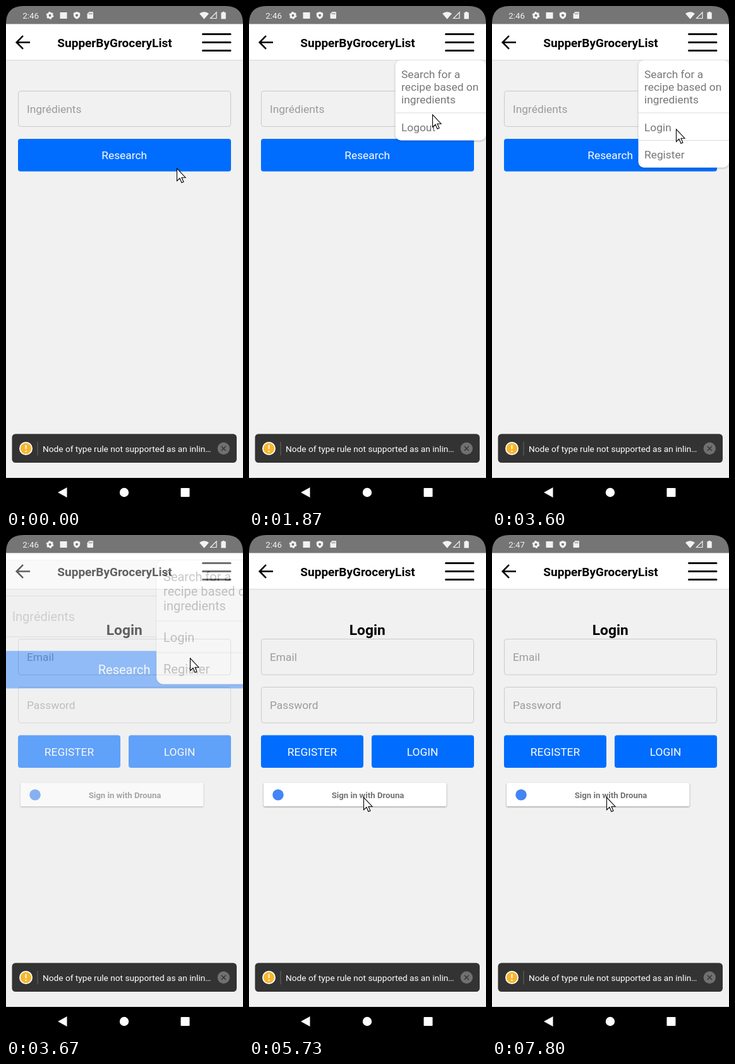
An HTML page that plays this animation: 375x792 px, repeating every 8 s.

```html
<!DOCTYPE html>
<html lang="en">
<head>
<meta charset="utf-8">
<title>Recipe search and login</title>
<style>
  html, body { margin: 0; width: 100%; height: 100%; overflow: hidden; background: #000; }
  svg { display: block; width: 100%; height: 100%; }
  text { font: 17.35px Roboto, sans-serif; }
  .title { font-size: 19px; font-weight: 700; text-anchor: middle; }
  .heading { font-size: 22.8px; font-weight: 700; text-anchor: middle; }
  .hint { fill: #9b9b9b; }
  .label { fill: #fff; text-anchor: middle; }
  .item { fill: #777; }
  .field { fill: none; stroke: #c9c9c9; }
  .button { fill: #006dff; }
  .rule { fill: #dcdcdc; }
  .sheet { fill: #fff; filter: drop-shadow(0 1px 1.5px rgba(0,0,0,.28)); }
  .clock { font-size: 13.3px; fill: #f2f2f2; }
  .toast { font-size: 13.68px; fill: #fff; }
  .provider { font-size: 13.2px; font-weight: 700; fill: #737373; text-anchor: middle; }

  /* The picture advances 15 times a second: 120 ticks per loop. */
  .anim { animation: 8s step-end -4ms infinite; }
  .search { transform-origin: 187.5px 387px; animation-name: search; }
  .login { animation-name: login; }
  .burger { animation-name: burger; }
  .guest { animation-name: guest; }
  .member { animation-name: member; }
  .logout { animation-name: logout; }
  .plate { animation-name: plate; }
  .lift { animation-name: lift; }
  .before { animation-name: before; }
  .after { animation-name: after; }
  .cursor { animation-name: cursor; }

  @keyframes search {
    0% { transform: scale(1); visibility: visible; }
    45.8333% { transform: scale(1.151); visibility: visible; }
    46.6667%, 100% { transform: scale(1); visibility: hidden; }
  }
  @keyframes login {
    0% { opacity: 0; }
    45.8333% { opacity: .6; }
    46.6667%, 100% { opacity: 1; }
  }
  @keyframes burger {
    0% { opacity: 1; }
    15% { opacity: .2; }
    18.3333%, 100% { opacity: 1; }
  }
  @keyframes member {
    0% { opacity: 0; }
    18.3333% { opacity: 1; }
    45%, 100% { opacity: 0; }
  }
  @keyframes logout {
    0% { opacity: 1; }
    30.8333%, 100% { opacity: .2; }
  }
  @keyframes guest {
    0% { opacity: 0; }
    45% { opacity: 1; }
    46.6667%, 100% { opacity: 0; }
  }
  @keyframes plate {
    0% { fill: #fff; }
    78.3333% { fill: #eee; }
    79.1667%, 100% { fill: #fff; }
  }
  @keyframes lift {
    0% { opacity: 0; }
    78.3333% { opacity: 1; }
    83.3333%, 100% { opacity: 0; }
  }
  @keyframes before { 0% { opacity: 1; } 97.5%, 100% { opacity: 0; } }
  @keyframes after { 0% { opacity: 0; } 97.5%, 100% { opacity: 1; } }
  @keyframes cursor {
    0% { transform: translate(270px, 256px); animation-timing-function: steps(4); }
    3.3333% { transform: translate(214px, 341px); animation-timing-function: steps(5); }
    7.5% { transform: translate(352px, 100px); animation-timing-function: steps(2); }
    9.1667% { transform: translate(336px, 67px); }
    17.5% { transform: translate(336px, 67px); animation-timing-function: steps(7); }
    23.3333% { transform: translate(290px, 171px); animation-timing-function: steps(3); }
    25.8333% { transform: translate(287px, 210px); animation-timing-function: steps(3); }
    28.3333% { transform: translate(289px, 194px); }
    29.1667% { transform: translate(291px, 194px); }
    61.6667% { transform: translate(258px, 247px); animation-timing-function: steps(3); }
    64.1667% { transform: translate(212px, 345px); animation-timing-function: steps(4); }
    67.5% { transform: translate(183px, 414px); }
    70% { transform: translate(182px, 414px); }
    71.6667%, 100% { transform: translate(181px, 414px); }
  }
</style>
</head>
<body>
<svg viewBox="0 0 375 792">
  <defs>
    <g id="header">
      <rect y="28" width="375" height="718" fill="#f1f1f1"/>
      <rect y="28" width="375" height="57" fill="#fff"/>
      <rect y="85" width="375" height="1" fill="#dedede"/>
      <rect y="86" width="375" height="1" fill="#ebebeb"/>
      <path d="M38 57.5H17M27 47.2L16.7 57.5L27 67.8" fill="none" stroke="#000" stroke-width="2.6"/>
      <text class="title" x="172" y="65">SupperByGroceryList</text>
    </g>
    <path id="bars" d="M311.5 44.5h43.5M311.5 57.5h43.5M311.5 70.5h43.5" stroke="#111" stroke-width="3" stroke-linecap="round"/>
    <g id="firstItem">
      <rect class="rule" x="231" y="168.5" width="144" height="1"/>
      <text class="item"><tspan x="241" y="114">Search for a</tspan><tspan x="241" y="134">recipe based on</tspan><tspan x="241" y="154">ingredients</tspan></text>
    </g>
  </defs>

  <g class="anim search">
    <use href="#header"/>
    <use href="#bars" class="anim burger"/>
    <rect class="field" x="19.5" y="134.5" width="336" height="56" rx="4"/>
    <text class="hint" x="33" y="169">Ingrédients</text>
    <rect class="button" x="19" y="210" width="337" height="51.5" rx="4"/>
    <text class="label" x="187.2" y="242.3">Research</text>
    <g class="anim member">
      <rect class="sheet" x="231.5" y="85.5" width="143.5" height="127" rx="9"/>
      <use href="#firstItem"/>
      <text class="item anim logout" x="241" y="197.7">Logout</text>
    </g>
    <g class="anim guest">
      <rect class="sheet" x="231.5" y="85.5" width="143.5" height="170" rx="9"/>
      <use href="#firstItem"/>
      <rect class="rule" x="231" y="212" width="144" height="1"/>
      <text class="item" x="241" y="197.7">Login</text>
      <text class="item" x="241" y="241">Register</text>
    </g>
  </g>

  <g class="anim login">
    <use href="#header"/>
    <use href="#bars"/>
    <text class="heading" x="187.3" y="158">Login</text>
    <rect class="field" x="19.5" y="164.5" width="336" height="56.5" rx="4"/>
    <text class="hint" x="33" y="199.3">Email</text>
    <rect class="field" x="19.5" y="240.5" width="336" height="56.5" rx="4"/>
    <text class="hint" x="33" y="275.3">Password</text>
    <rect class="button" x="19" y="316.5" width="162" height="51.5" rx="4"/>
    <rect class="button" x="194" y="316.5" width="162" height="51.5" rx="4"/>
    <text class="label" x="100" y="349">REGISTER</text>
    <text class="label" x="274.5" y="349">LOGIN</text>
    <rect class="anim lift" x="25" y="428" width="285" height="5.5" rx="2" fill="#d2d2d2"/>
    <g style="filter: drop-shadow(0 1px 1px rgba(0,0,0,.4))">
      <rect class="anim plate" x="23" y="392" width="289.5" height="37" rx="2" fill="#fff"/>
    </g>
    <circle cx="46" cy="410.7" r="8.8" fill="#4285f4"/>
    <text class="provider" x="188" y="415.6">Sign in with Drouna</text>
  </g>

  <!-- status bar -->
  <rect width="375" height="28.5" fill="#757575"/>
  <text class="clock" x="26.3" y="19.9">2:4<tspan class="anim before"></tspan></text>
  <text class="clock anim before" x="44.5" y="19.9">6</text>
  <text class="clock anim after" x="44.5" y="19.9">7</text>
  <g fill="#f2f2f2">
    <circle cx="69.5" cy="15" r="3.4" fill="none" stroke="#f2f2f2" stroke-width="3"/>
    <circle cx="69.5" cy="15" r="5.1" fill="none" stroke="#f2f2f2" stroke-width="1.6" stroke-dasharray="2.67"/>
    <rect x="85.5" y="10" width="11" height="10"/>
    <path d="M112 9l5.2 2v3.6q0 4-5.2 6.2q-5.2-2.2-5.2-6.2V11z"/>
    <circle cx="112" cy="14.7" r="2" fill="#757575"/>
    <path d="M131.5 9.3H137q1 0 1 1V19q0 1-1 1h-7.5q-1 0-1-1v-6.5z"/>
    <path d="M131.7 11v2.4M133.8 11v2.4M135.9 11v2.4" stroke="#757575"/>
    <path d="M306 12q7.5-5.6 15 0l-7.5 8.7z"/>
    <path d="M323.5 19.5h9.5V10z" fill="none" stroke="#f2f2f2" stroke-width="1.2"/>
    <path d="M342.6 9h3v1.2h2.2v10.4h-7.4V10.2h2.2z"/>
  </g>
  <path d="M0 0H28Q0 0 0 28zM375 0H347Q375 0 375 28z"/>

  <!-- warning toast -->
  <rect x="9.5" y="676.5" width="355.5" height="45.5" rx="5.5" fill="#333"/>
  <circle cx="31.5" cy="699.5" r="9.6" fill="#f8b62d" stroke="#fff" stroke-width="1.8"/>
  <path d="M31.5 694v6.5M31.5 703v2" stroke="#fff" stroke-width="2"/>
  <rect x="49.5" y="689" width="1" height="21.5" fill="#686868"/>
  <text class="toast" x="58" y="704.8">Node of type rule not supported as an inlin…</text>
  <circle cx="344.3" cy="699.5" r="9.7" fill="#707070"/>
  <path d="M340.8 696l7 7M347.8 696l-7 7" stroke="#333" stroke-width="1.3"/>

  <!-- navigation bar -->
  <rect y="746" width="375" height="46"/>
  <g fill="#fff">
    <path d="M82 769L96.5 761V777z"/>
    <circle cx="187" cy="769" r="7.2"/>
    <rect x="276.5" y="762" width="14" height="14" rx="1"/>
  </g>

  <path class="anim cursor" d="M.5.8V20.5L5 16.3L8 23.2L11 22L8 15.2H14z" fill="#fff" stroke="#000" stroke-width="1.1"/>
</svg>
</body>
</html>
```
